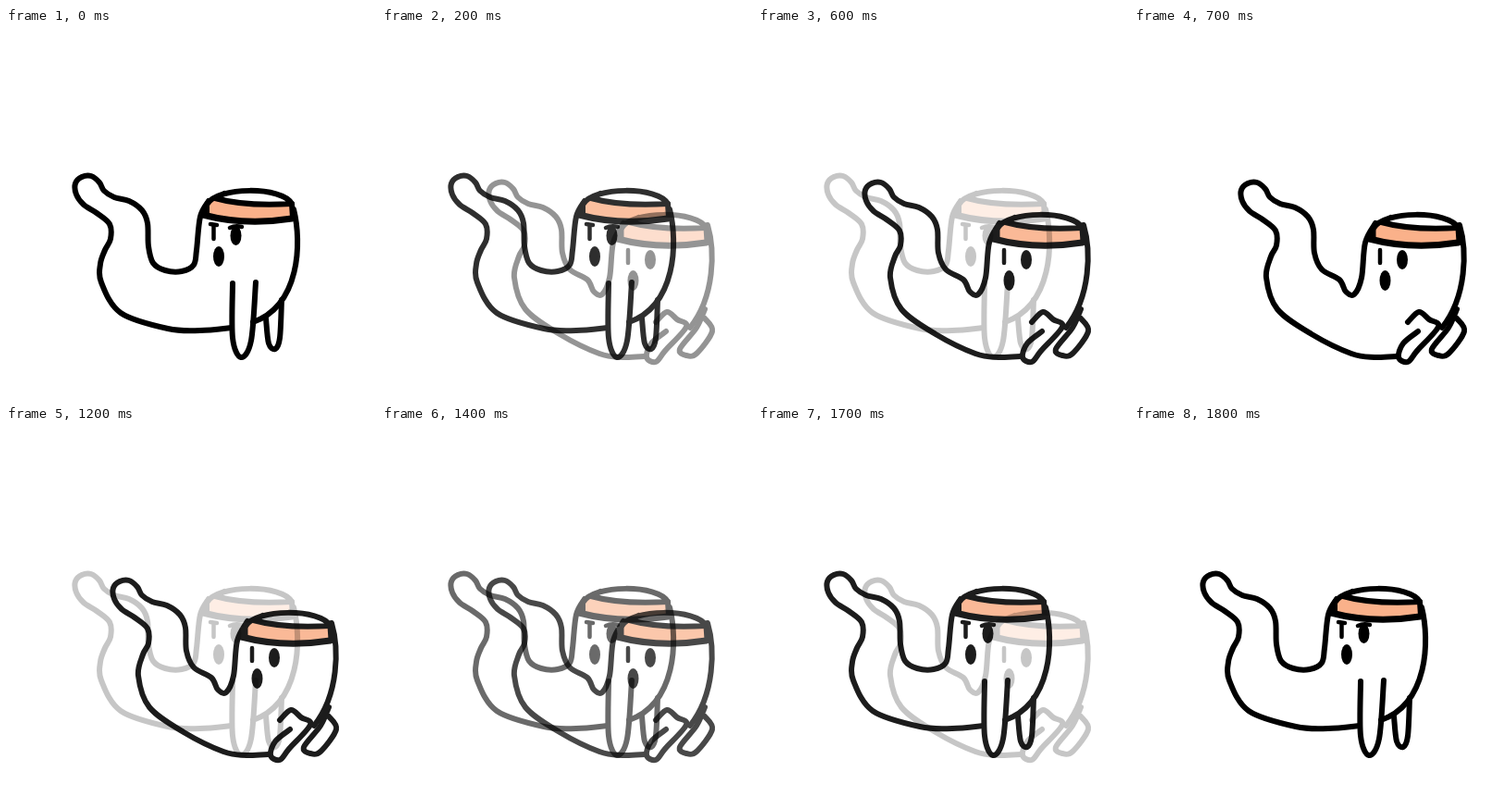
Recreate the animation shown at these times as an HTML page. Size 400 by 400 pixels, loop 1.9 s.

```html
<!DOCTYPE html>
<html>
<head>
<meta charset="utf-8">
<style>
html, body { margin: 0; width: 100%; height: 100%; overflow: hidden; background: #fff; }
svg { display: block; width: 100vw; height: 100vh; }
.pose { mix-blend-mode: multiply; }
path { fill: none; stroke: #000; stroke-width: 6; stroke-linecap: round; stroke-linejoin: round; }
.band { fill: #fab18a; stroke: none; }
.bold { stroke-width: 7; }
.thin { stroke-width: 4.5; }
</style>
</head>
<body>
<svg viewBox="0 0 400 400">
  <defs>
    <g id="head">
      <path class="band" d="M222 185Q258 193 309 190L308 207Q258 213 214 202Z"/>
      <path d="M217 191C228 171 299 171 309 190Q258 193 226 184L236 179"/>
      <path class="bold" d="M213 202Q258 214 309 206"/>
      <path d="M217 191L217 202M309 190L310 205"/>
      <path class="thin" d="M224.5 214V228"/>
      <ellipse cx="248.5" cy="224.5" rx="6" ry="10.5"/>
      <ellipse cx="230" cy="247" rx="6" ry="11"/>
    </g>
  </defs>
  <g id="up" class="pose">
    <use href="#head"/>
    <path class="thin" d="M221 212L228 213M242 216Q248 213 255 215"/>
    <path d="M311 196C320 232 318 300 267 318"/>
  </g>
  <g id="down" class="pose">
    <use href="#head" x="41.5" y="26"/>
    <path d="M352 213C360 240 360 290 333 324"/>
  </g>
</svg>
<script>
const pts = text => text.split(' ').map(s => s.split(',').map(Number));

// Smooth curve through a few points
function stroke(id, p) {
  let d = 'M' + p[0];
  for (let i = 0; i < p.length - 1; i++) {
    const a = p[i - 1] || p[i], b = p[i], c = p[i + 1], e = p[i + 2] || c;
    const c1 = b.map((v, k) => v + (c[k] - a[k]) / 6);
    const c2 = c.map((v, k) => v - (e[k] - b[k]) / 6);
    d += `C${c1} ${c2} ${c}`;
  }
  const path = document.createElementNS('http://www.w3.org/2000/svg', 'path');
  path.setAttribute('d', d);
  document.getElementById(id).append(path);
}

// Both poses share the tail, moved with the body
const tail = pts('107,240 113,228 112,212 98,200 84,191 76,180 75,168 82,161 92,160 101,167 106,176 117,183 133,187 147,197 153,211 154,236');

function body(id, belly, [dx, dy], throat, arms) {
  const moved = tail.map(([x, y]) => [x + dx, y + dy]);
  stroke(id, [...pts(belly), ...moved, ...pts(throat)]);
  arms.forEach(arm => stroke(id, pts(arm)));
}

body('up',
  '244,324 210,327 175,325 124,308 103,275 102,255', [0, 0],
  '159,254 172,262 190,263 203,256 206,240 210,204 219,187',
  ['245,276 245,335 254,356 265,338 270,275', '281,314 284,341 291,347 296,335 298,294']);

body('down',
  '284,355 260,356 235,352 192,331 155,304 143,270', [41, 7],
  '203,261 222,272 229,285 238,288 246,270 250,232 261,211',
  ['296,318 308,307 319,315 329,323 306,349 296,361 286,356 291,341 307,328',
   '349,304 340,324 322,347 329,354 340,352 357,328 349,314']);

// Crossfade in held steps, there and back
const LOOP = 1900, STEP = 100, STEPS = 7, BACK = 1100;
const level = w => w < 1 ? w * (1.7 - 0.77 * w) : 1;

function fade(id, rising) {
  const keys = [];
  const key = (t, opacity) => keys.push({ offset: t / LOOP, opacity, easing: 'steps(1, end)' });
  for (const [start, up] of [[0, rising], [BACK, !rising]]) {
    for (let k = 0; k <= STEPS; k++) {
      key(start + k * STEP, level((up ? k : STEPS - k) / STEPS));
    }
  }
  key(LOOP, rising ? 0 : 1);
  document.getElementById(id).animate(keys, { duration: LOOP, iterations: Infinity });
}

fade('up', false);
fade('down', true);
</script>
</body>
</html>
```
